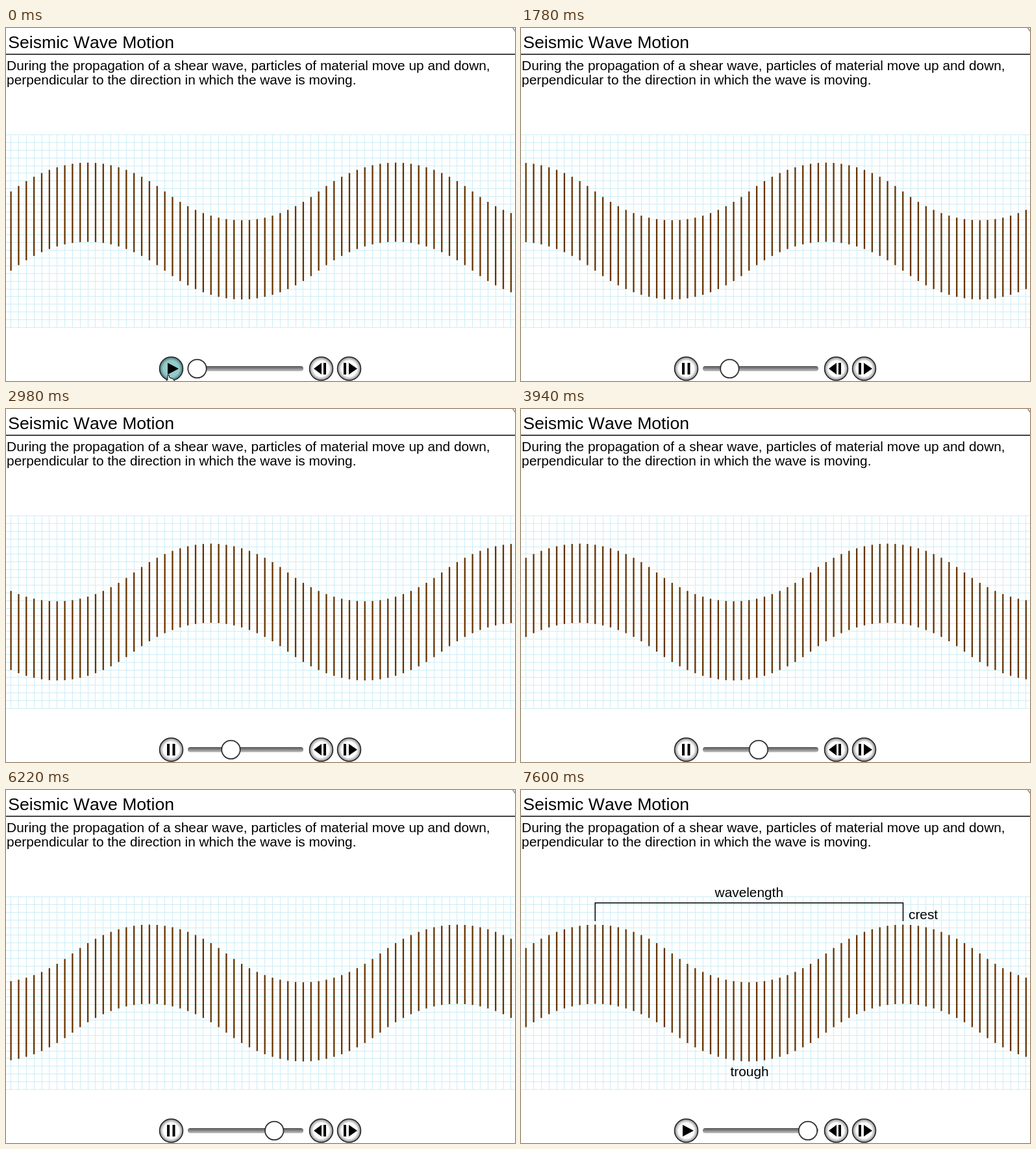
Recreate the animation shown at these times as an HTML page with a canvas. Size 784 px wide and 544 px high, loop 9600 ms.

```html
<!DOCTYPE html>
<html lang="en">
<head>
<meta charset="utf-8">
<title>Seismic Wave Motion</title>
<style>
html, body { margin: 0; width: 784px; height: 544px; overflow: hidden; background: #fff; }
canvas { display: block; }
</style>
</head>
<body>
<canvas id="stage" width="784" height="544"></canvas>
<script>
const c = document.getElementById("stage").getContext("2d");
const LOOP = 9600, START = 400, STEP = 60, LAST = 121, END = 159;
const PITCH = 11.85, LEFT = 7.6;

function text(str, x, y, size = 20.83) {
  c.font = size + "px 'Liberation Sans', Arial, sans-serif";
  c.fontKerning = "none";
  c.fillStyle = "#000";
  c.fillText(str, x, y);
}

function line(points, color, width) {
  c.beginPath();
  points.forEach(([x, y]) => c.lineTo(x, y));
  c.strokeStyle = color;
  c.lineWidth = width;
  c.stroke();
}

function shape(points, fill = "#000") {
  c.beginPath();
  points.forEach(([x, y]) => c.lineTo(x, y));
  c.closePath();
  c.fillStyle = fill;
  c.fill();
}

function disc(x, y, r, fill, stroke, width) {
  c.beginPath();
  c.arc(x, y, r, 0, 7);
  c.fillStyle = fill;
  c.fill();
  c.strokeStyle = stroke;
  c.lineWidth = width;
  c.stroke();
}

function shade(x, y, r, stops) {
  const g = c.createRadialGradient(x, y, 0, x, y, r);
  stops.forEach(([at, color]) => g.addColorStop(at, color));
  return g;
}

function button(x, lit) {
  const stops = lit
    ? [[0, "#9acfcf"], [0.7, "#92c8c8"], [0.85, "#6f9f9f"], [1, "#4a6b6b"]]
    : [[0, "#fff"], [0.66, "#fff"], [0.84, "#c4c4c4"], [1, "#777"]];
  disc(x, 525, 18, shade(x, 525, 18, stops), "#222", 1.5);
}

const bar = (x, w = 4) => shape([[x, 516], [x + w, 516], [x + w, 534], [x, 534]]);
const arrow = (from, tip) => shape([[from, 516], [tip, 525], [from, 534]]);

// Height from -1 (crest) to 1 (trough), built from parabolic arcs
function wave(i) {
  const m = ((i % 40) + 40) % 40, d = Math.min(m, 40 - m);
  return d <= 10 ? (d / 10) ** 2 - 1 : 1 - ((20 - d) / 10) ** 2;
}

function page() {
  c.fillStyle = "#fff";
  c.fillRect(0, 0, 784, 544);
  text("Seismic Wave Motion", 3.3, 31, 26.6);
  line([[0, 40.5], [784, 40.5]], "#000", 1.5);
  line([[780, -1], [785, 6]], "#888", 1.5);
  text("During the propagation of a shear wave, particles of material move up and down,", 1.1, 65);
  text("perpendicular to the direction in which the wave is moving.", 1.1, 87);
  c.fillStyle = "#cdeef6";
  for (let i = 0; i <= 65; i++) c.fillRect(Math.floor(LEFT + i * PITCH), 164, 1, 298);
  for (let i = 0; i <= 25; i++) c.fillRect(0, Math.floor(164.5 + i * 11.88), 784, 1);
}

function bars(n) {
  for (let i = 0; i <= 65; i++) {
    const x = LEFT + i * PITCH, y = 251.9 + 44.4 * wave(i - 10 - n);
    line([[x, y], [x, y + 122]], "#663300", 2.3);
  }
}

function labels() {
  line([[114.2, 202], [114.2, 174], [588.5, 174], [588.5, 202]], "#000", 1.5);
  text("wavelength", 298.6, 165);
  text("crest", 597, 199);
  text("trough", 322.5, 441);
}

function controls(n, k) {
  const g = c.createLinearGradient(0, 521, 0, 529);
  g.addColorStop(0, "#555");
  g.addColorStop(0.5, "#888");
  g.addColorStop(1, "#c8c8c8");
  c.fillStyle = g;
  c.beginPath();
  c.roundRect(280, 521, 178, 8, 4);
  c.fill();
  const x = 294.5 + 147.5 * n / END;
  disc(x, 525, 14.3, shade(x, 525, 14.3, [[0, "#fff"], [0.8, "#fff"], [1, "#c8c8c8"]]), "#222", 1.5);

  button(254.5, k === 0);
  if (k === 0 || k === LAST) arrow(249, 266);
  else { bar(248); bar(256.5); }
  button(485.5);
  arrow(486, 474);
  bar(489);
  button(528.5);
  bar(520);
  arrow(528, 541);
}

function pointer() {
  const hand = [[249, 535], [251, 535], [252, 539], [257, 540.5], [259, 543], [259, 547], [250, 547], [247, 542], [249, 542]];
  shape(hand, "#fff");
  line([...hand, hand[0]], "#000", 1);
}

function draw(t) {
  const k = t < START ? 0 : Math.min(LAST, Math.floor((t - START) / STEP) + 1);
  const n = Math.min(END, Math.max(0, k - 1, Math.floor(1.34 * k - 2.5)));
  page();
  bars(n);
  if (k === LAST) labels();
  controls(n, k);
  if (k === 0) pointer();
}

const begin = performance.now();
function tick() {
  draw((performance.now() - begin) % LOOP);
  requestAnimationFrame(tick);
}
tick();
</script>
</body>
</html>
```
